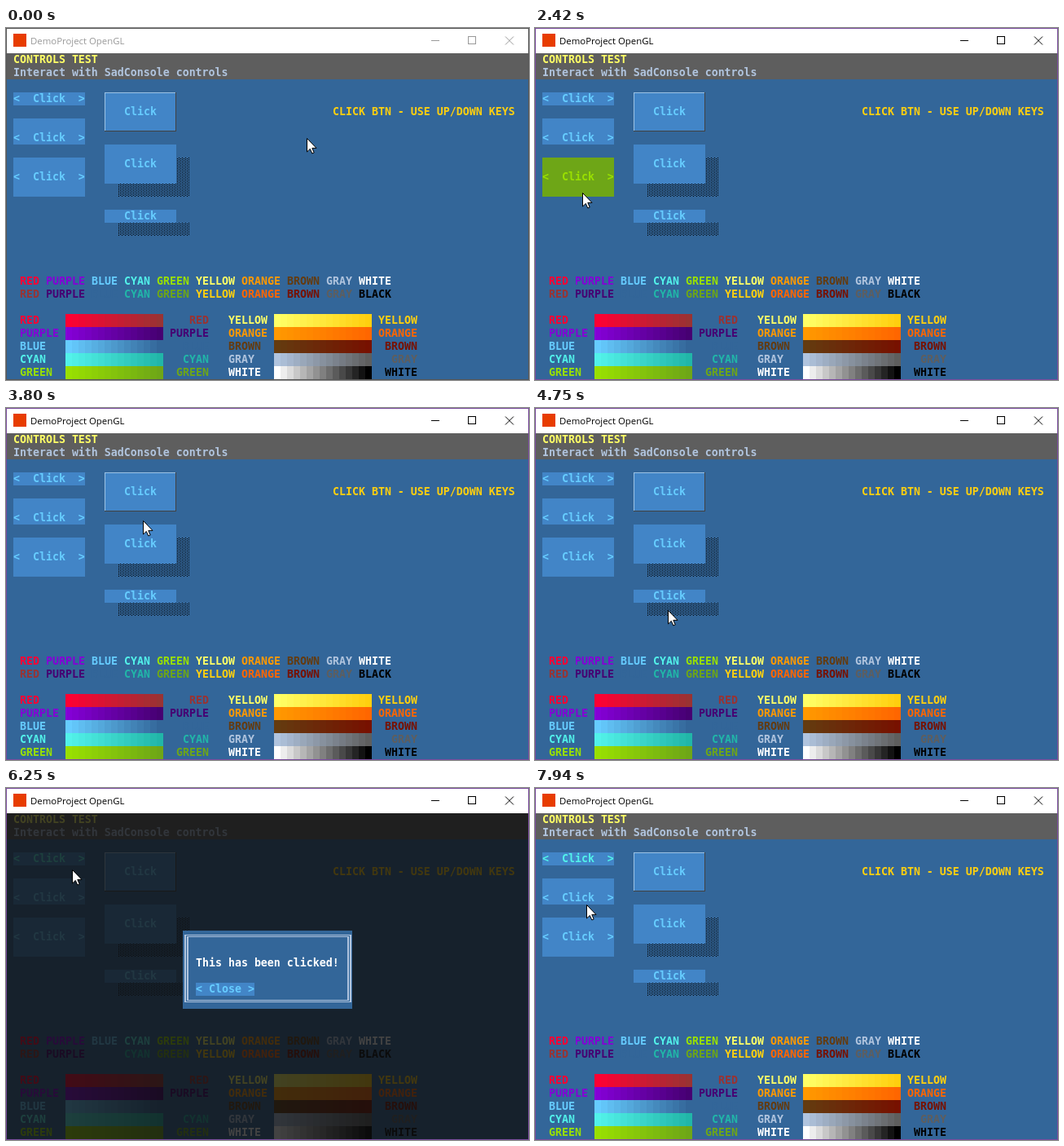
Animation of 642x432 px, one loop 8 s. Source, as an HTML page:

```html
<!DOCTYPE html>
<html lang="en">
<head>
<meta charset="utf-8">
<title>Controls test</title>
<style>
  html, body { margin: 0; width: 100%; height: 100%; overflow: hidden; background: #369; }
  svg { display: block; }
  rect { shape-rendering: crispEdges; }
  text { white-space: pre; font: bold 13.288px "DejaVu Sans Mono", monospace; }
  #frame { color: #999; --edge: #555; }
  #frame.active { color: #000; --edge: #7a4b9d; }
  #frame text { font: 11.4px "Open Sans", "Noto Sans", sans-serif; fill: currentColor; }
  #frame path { fill: none; stroke: currentColor; }
  #edge { fill: none; stroke: var(--edge); }
</style>
</head>
<body>
<svg id="stage" width="642" height="432" viewBox="0 0 642 432">
  <defs>
    <pattern id="shade" x="1" y="31" width="4" height="2" patternUnits="userSpaceOnUse">
      <rect x="3" width="1" height="1"/>
      <rect x="1" y="1" width="1" height="1"/>
    </pattern>
  </defs>
  <rect width="642" height="432" fill="#369"/>
  <g id="console"></g>
  <g id="popup"></g>
  <g id="frame">
    <rect width="642" height="31" fill="#fff"/>
    <rect x="9" y="7" width="16" height="16" fill="#e73c00"/>
    <text x="30" y="20">DemoProject OpenGL</text>
    <path d="M522 15.5h10M567.5 10.5h9v9h-9z" shape-rendering="crispEdges"/>
    <path d="M613 10.5l10 10M623 10.5l-10 10"/>
    <rect id="edge" x=".5" y=".5" width="641" height="431"/>
  </g>
  <path id="cursor" d="M.5 .5V17L4.3 13.4L6.8 19L9.2 18L6.8 12.4H12z" fill="#fff" stroke="#000"/>
</svg>
<script>
const LOOP = 8000, COL = 8, ROW = 16;
const ACTIVATE = 570, PRESS = 5630, OPEN = 5870, PRESS_CLOSE = 7130, CLOSE = 7210;

const C = {
  white: [255, 255, 255], black: [0, 0, 0],
  gray: [176, 196, 222], grayDark: [94, 94, 94],
  red: [255, 0, 51], redDark: [153, 51, 51],
  purple: [132, 0, 214], purpleDark: [70, 0, 114],
  blue: [102, 204, 255], blueDark: [51, 102, 153],
  cyan: [82, 242, 234], cyanDark: [33, 182, 168],
  green: [153, 224, 0], greenDark: [110, 166, 23],
  yellow: [255, 255, 102], yellowDark: [255, 207, 15],
  orange: [255, 153, 0], orangeDark: [255, 102, 0],
  brown: [100, 59, 15], brownDark: [119, 17, 0],
  face: [66, 133, 199], edgeLight: [156, 195, 230], edgeDark: [66, 66, 66]
};
const rgb = c => `rgb(${c.map(Math.round)})`;
const mix = (a, b, u) => a.map((v, i) => v + (b[i] - v) * u);
const $ = id => document.getElementById(id);
const px = col => 1 + col * COL, py = row => 31 + row * ROW;

function add(parent, tag, attrs, text) {
  const el = document.createElementNS("http://www.w3.org/2000/svg", tag);
  for (const name in attrs) el.setAttribute(name, attrs[name]);
  if (text) el.textContent = text;
  return parent.appendChild(el);
}
const box = (parent, x, y, width, height, fill) => add(parent, "rect", { x, y, width, height, fill });
const cells = (parent, col, row, w, h, fill) => box(parent, px(col), py(row), w * COL, h * ROW, fill);
const print = (parent, col, row, text, color) =>
  add(parent, "text", { x: px(col), y: py(row) + 12, fill: rgb(color) }, text);

function button(parent, col, row, w, h, label, keepsFace) {
  const face = cells(parent, col, row, w, h, rgb(C.face));
  const text = print(parent, col + (w - label.length) / 2, row + (h >> 1), label, C.blue);
  const x = px(col), y = py(row);
  return {
    contains: p => p[0] >= x && p[0] < x + w * COL && p[1] >= y && p[1] < y + h * ROW,
    paint(state) {
      const [fg, bg] = {
        normal: [C.blue, C.face], focused: [C.cyan, C.face],
        over: [C.green, C.greenDark], down: [C.greenDark, C.yellow]
      }[state];
      text.setAttribute("fill", rgb(fg));
      if (!keepsFace) face.setAttribute("fill", rgb(bg));
    }
  };
}

// Console
const con = $("console");
cells(con, 0, 0, 80, 2, rgb(C.grayDark));
print(con, 1, 0, "CONTROLS TEST", C.yellow);
print(con, 1, 1, "Interact with SadConsole controls", C.gray);
print(con, 50, 4, "CLICK BTN - USE UP/DOWN KEYS", C.yellowDark);

cells(con, 17, 8, 11, 3, "url(#shade)");
cells(con, 17, 13, 11, 1, "url(#shade)");
const arrows = "<  Click  >";
const buttons = [
  button(con, 1, 3, 11, 1, arrows),
  button(con, 1, 5, 11, 2, arrows),
  button(con, 1, 8, 11, 3, arrows),
  button(con, 15, 3, 11, 3, "Click", true),
  button(con, 15, 7, 11, 3, "Click"),
  button(con, 15, 12, 11, 1, "Click")
];
box(con, 121, 79, 88, 1, rgb(C.edgeLight));
box(con, 121, 79, 1, 48, rgb(C.edgeLight));
box(con, 121, 126, 88, 1, rgb(C.edgeDark));
box(con, 208, 79, 1, 48, rgb(C.edgeDark));

// Palette words, then a fading bar for each colour
const names = "red purple blue cyan green yellow orange brown gray white".split(" ");
let col = 2;
names.forEach((name, i) => {
  const dark = name === "white" ? C.black : C[name + "Dark"];
  const word = name.toUpperCase();
  print(con, col, 17, word, C[name]);
  print(con, col, 18, name === "white" ? "BLACK" : word, dark);
  col += word.length + 1;

  const left = i < 5 ? 2 : 34, bar = left + 7, row = 20 + i % 5;
  print(con, left, row, word, C[name]);
  for (let s = 0; s < 15; s++) cells(con, bar + s, row, 1, 1, rgb(mix(C[name], dark, s / 14)));
  print(con, bar + (i < 5 ? 22 : 22) - word.length, row, word, dark);
});

// Modal popup
const popup = $("popup");
box(popup, 1, 31, 640, 400, "rgba(15,15,15,.784)");
cells(popup, 27, 9, 26, 6, rgb(C.blueDark));
function outline(x, y, w, h) {
  for (const dx of [0, w - 2]) box(popup, x + dx, y, 2, h, rgb(C.gray));
  for (const dy of [0, h - 1]) box(popup, x, y + dy, w, 1, rgb(C.gray));
}
outline(219, 180, 205, 83);
outline(222, 182, 199, 79);
print(popup, 29, 11, "This has been clicked!", C.white);
const closeButton = button(popup, 29, 13, 9, 1, "< Close >");

// Pointer moves: start time, step length, waypoints [step, x, y]
const moves = [
  { start: 1040, dt: 72.45, path: [
    [-1, 369, 135], [2, 317, 118], [6, 211, 83], [8, 143, 69], [10, 80, 63], [15, 66, 132],
    [19, 58, 202], [20, 57, 215], [22, 61, 187], [25, 70, 132], [28, 86, 80], [30, 118, 77],
    [34, 172, 98], [38, 168, 138], [46, 170, 228], [49, 176, 247]] },
  { start: 4750, dt: 72.5, path: [[-1, 176, 247], [2, 112, 240], [4, 91, 194], [6, 74, 128], [8, 65, 86]] },
  { start: 6250, dt: 74, path: [
    [-1, 65, 86], [2, 162, 172], [5, 317, 298], [6, 346, 319], [8, 313, 278], [10, 280, 246], [11, 279, 245]] },
  { start: 7440, dt: 71.4, path: [[-1, 279, 245], [2, 135, 158], [4, 36, 104], [5, 4, 108], [6, 25, 127], [7, 63, 143]] }
];

// Cubic through the waypoints, resting at both ends
function along(path, k) {
  const last = path.length - 1;
  if (k >= path[last][0]) return path[last].slice(1);
  let i = 0;
  while (k >= path[i + 1][0]) i++;
  const a = path[i], b = path[i + 1], span = b[0] - a[0], u = (k - a[0]) / span;
  const slope = (j, d) => j === 0 || j === last ? 0
    : (path[j + 1][d] - path[j - 1][d]) / (path[j + 1][0] - path[j - 1][0]);
  const e = u * u * (3 - 2 * u);
  return [1, 2].map(d => Math.round(
    a[d] + (b[d] - a[d]) * e +
    span * u * (1 - u) * ((1 - u) * slope(i, d) - u * slope(i + 1, d))));
}

function pointerAt(t) {
  const move = moves.filter(m => t >= m.start).pop();
  return move ? along(move.path, Math.floor((t - move.start) / move.dt + 0.01)) : [369, 135];
}

function draw(t) {
  const p = pointerAt(t);
  const modal = t >= OPEN && t < CLOSE;
  $("frame").classList.toggle("active", t >= ACTIVATE);
  popup.style.display = modal ? "" : "none";
  buttons.forEach((b, i) => {
    let state = i === 0 && t >= OPEN ? "focused" : "normal";
    if (!modal && b.contains(p)) state = i === 0 && t >= PRESS && t < OPEN ? "down" : "over";
    b.paint(state);
  });
  closeButton.paint(!closeButton.contains(p) ? "normal" : t >= PRESS_CLOSE ? "down" : "over");
  $("cursor").setAttribute("transform", `translate(${p})`);
}

let origin;
function tick(now) {
  origin ??= now;
  draw((now - origin) % LOOP);
  requestAnimationFrame(tick);
}
draw(0);
requestAnimationFrame(tick);
</script>
</body>
</html>
```
